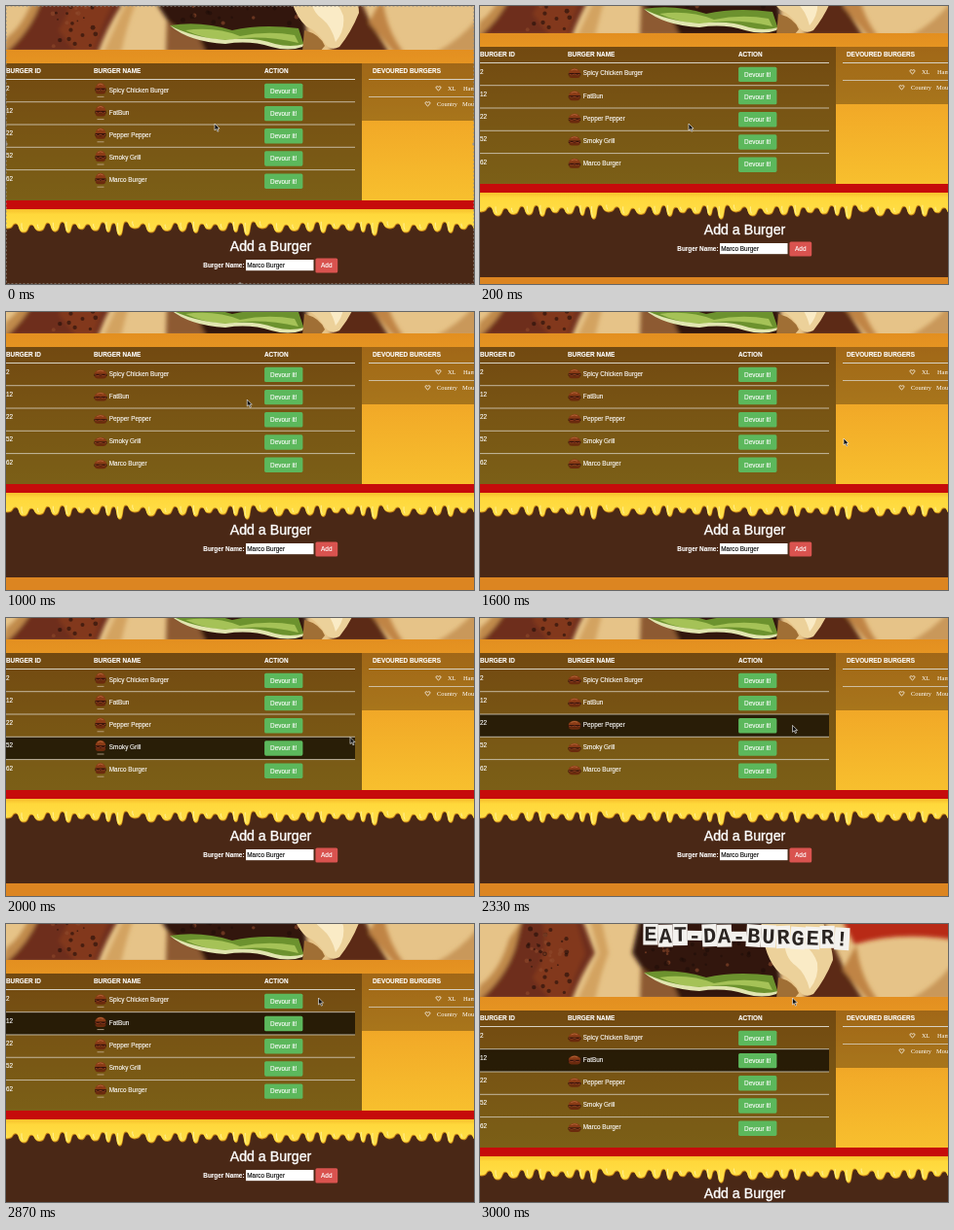
Write an HTML page that moves like this. It is 480 px wide and 286 px high and loops after 3070 ms.

```html
<!DOCTYPE html>
<html lang="en">
<head>
<meta charset="utf-8">
<title>Burger list</title>
<style>
  html, body { margin: 0; width: 100%; height: 100%; overflow: hidden; background: #4a2816; }
  svg { display: block; width: 480px; height: 286px; }
  text { font: 6.4px "Liberation Sans", Arial, sans-serif; fill: #fff; stroke: #fff; stroke-width: .12px; white-space: pre; }
  .bold { font-weight: bold; }
  .serif { font-family: "Liberation Serif", Times, serif; stroke: none; }
  .title { font-size: 14.2px; stroke-width: .35px; }
  .entry { fill: #000; stroke: #000; }
  .cutout { font: bold 22px "Liberation Mono", Courier, monospace; fill: #2b2522; stroke: none; text-anchor: middle; }
</style>
</head>
<body>
<svg viewBox="0 0 480 286">
  <defs>
    <linearGradient id="sky" x2="0" y2="1">
      <stop stop-color="#e38f20"/><stop offset=".5" stop-color="#f2ab28"/><stop offset="1" stop-color="#f8c22f"/>
    </linearGradient>
    <linearGradient id="cheese" x2="0" y2="1">
      <stop stop-color="#f6bf2c"/><stop offset=".2" stop-color="#ffd83b"/><stop offset="1" stop-color="#ffe04a"/>
    </linearGradient>
    <filter id="soft" x="-10%" y="-10%" width="120%" height="120%"><feGaussianBlur stdDeviation="2.2"/></filter>
    <filter id="crisp"><feGaussianBlur stdDeviation=".7"/></filter>
    <g id="burger">
      <path d="M-6 -.5C-6 -8 6 -8 6 -.5Z" fill="#8a3b16"/>
      <path d="M-3.5 -4Q0 -6.4 3 -4.2" stroke="#b96a3c" stroke-width=".9" fill="none"/>
      <path d="M-6.3 -.8H6.3V2H-6.3Z" fill="#34120a"/>
      <path d="M-5.8 .4L-3 1.6L0 .5L3 1.7L5.8 .4" stroke="#b04c28" stroke-width=".8" fill="none"/>
      <path d="M-6 2H6Q5.6 5 3 5H-3Q-5.6 5 -6 2Z" fill="#6b2a0d"/>
    </g>
  </defs>
  <g id="page"></g>
  <g id="handles" fill="#9a948c">
    <rect x=".5" y=".5" width="479" height="285" fill="none" stroke="#9a948c" stroke-dasharray="2 2" opacity=".6"/>
    <circle cx="0" cy="142" r="1.7"/><circle cx="480" cy="142" r="1.7"/>
    <circle cx="240" cy="286" r="1.7"/>
  </g>
  <path id="cursor" d="M0 0V7L1.7 5.5L2.9 8.2L4.1 7.7L2.9 5.1H5.1Z" fill="#111" stroke="#fff" stroke-width=".6"/>
</svg>
<script>
const LOOP = 3070, STEP = LOOP / 46, ROW = 23.3, REST = 22;
const page = document.getElementById("page");
const cursor = document.getElementById("cursor");
const handles = document.getElementById("handles");

function add(parent, tag, attrs, content) {
  const node = document.createElementNS("http://www.w3.org/2000/svg", tag);
  for (const key in attrs) node.setAttribute(key, attrs[key]);
  if (content) node.textContent = content;
  parent.appendChild(node);
  return node;
}
const rect = (x, y, width, height, fill, more) =>
  add(page, "rect", { x, y, width, height, fill, ...more });
const label = (x, y, content, style = "", more) =>
  add(page, "text", { x, y, class: style, ...more }, content);
const rule = (x, y, right, width = .8) =>
  add(page, "path", { d: `M${x} ${y}H${right}`, stroke: "#d8d2c4", "stroke-width": width });
const noise = n => { const v = Math.sin(n * 12.9898) * 43758.5453; return v - Math.floor(v); };

function button(x, y, width, height, fill, content) {
  rect(x, y, width, height, fill, { rx: 1.6 });
  label(x + width / 2, y + height / 2 + 2.3, content, "", { "text-anchor": "middle" });
}

// The y axis of the page starts at the lower edge of the photo.
function drawPhoto() {
  rect(-5, -110, 490, 110, "#e6c388");
  const soft = add(page, "g", { filter: "url(#soft)" });
  const crisp = add(page, "g", { filter: "url(#crisp)" });
  const shape = (group, d, fill) => add(group, "path", { d, fill });

  // Bun shading and meat
  shape(soft, "M0 -12Q20 -26 30 -60L44 -80L48 -50L14 4H-4Z", "#c08a4c");
  shape(soft, "M44 -82L36 -50Q26 -20 0 3H94Q104 -24 118 -45L104 -82Z", "#6e2f1a");
  shape(soft, "M62 -82Q74 -50 54 -20L72 3H90Q98 -26 108 -44L98 -82Z", "#82391f");
  shape(soft, "M112 -82L122 -45L100 3H118Q124 -25 132 -45L124 -82Z", "#d3a361");
  shape(soft, "M164 -82L156 -45L172 -20L166 3H310L302 -82Z", "#30180f");
  shape(soft, "M165 -30Q178 -18 196 -17L205 3H164Z", "#8d5a30");
  shape(soft, "M350 -82Q364 -50 374 -28L393 3H332L346 -24Z", "#5b2c18");
  shape(soft, "M370 -82H490V-58Q430 -68 384 -54Z", "#b82a18");
  shape(soft, "M386 -54Q390 -20 408 3H398L372 -28Z", "#c08444");
  shape(soft, "M440 3Q466 -10 485 -34V3Z", "#c9985a");

  for (let i = 0; i < 90; i++) {
    const x = i % 2 ? 48 + noise(i) * 44 : 170 + noise(i) * 130;
    add(crisp, "circle", {
      cx: x, cy: -72 + noise(i + 200) * (i % 2 ? 70 : 45), r: .8 + noise(i + 400) * 1.8,
      fill: i % 3 ? "#1f0d08" : "#8e4a2c", opacity: .6
    });
  }

  // Lettuce and melted cheese
  shape(crisp, "M168 -25Q200 -30 232 -20Q262 -27 300 -22L306 -4Q290 0 274 -5Q250 -12 225 -7Q190 -9 168 -25Z", "#6c922e");
  shape(crisp, "M184 -20Q215 -24 240 -14Q268 -20 296 -15L300 -7Q260 -16 230 -10Q205 -10 184 -20Z", "#a5c257");
  shape(crisp, "M168 -25Q190 -13 225 -10Q254 -14 276 -6Q292 -2 306 -6L304 -3Q290 2 272 -3Q250 -10 225 -6Q188 -8 168 -25Z", "#e1e5b0");
  shape(crisp, "M288 -82H350Q362 -50 362 -38Q354 -18 342 -3Q332 2 326 -8Q318 -20 308 -24Q290 -40 288 -82Z", "#ecd19a");
  shape(crisp, "M312 -60Q338 -58 346 -35Q348 -20 338 -8Q334 -24 324 -32Q312 -40 312 -60Z", "#faebc6");
  shape(crisp, "M306 -20Q322 -16 327 -4L322 2H304Z", "#a06f35");
}

function drawBanner() {
  [..."EAT-DA-BURGER!"].forEach((letter, i) => {
    const dash = letter === "-";
    const tilt = (noise(i + 3) - .5) * 8;
    const group = add(page, "g", {
      transform: `translate(${175 + i * 15.1} ${-65 + i * .25 + noise(i) * 2}) rotate(${tilt})`
    });
    const height = dash ? 10 : 23;
    add(group, "rect", { x: -7.6, y: -height / 2, width: 15.2, height, fill: "#f4f2ee" });
    add(group, "text", { y: 7.2, class: "cutout" }, letter);
  });
}

function drawCheese() {
  let x = -8, base = 177, edge = `M${x} 164V${base}`, glints = "";
  for (let i = 0; x < 490; i++) {
    const width = 11 + noise(i % 9 + 20) * 9, right = x + width, mid = x + width / 2;
    const tip = 183 + noise(i % 9 + 2) * 8;
    const next = 176 + noise(i % 9 + 40) * 4;
    edge += `C${x + 4} ${base} ${x + 2} ${tip} ${mid} ${tip}S${right - 4} ${next} ${right} ${next}`;
    glints += `M${mid - 1.8} ${base}Q${mid - 2.4} ${tip - 5} ${mid - .8} ${tip - 2}`;
    x = right;
    base = next;
  }
  edge += "V164Z";
  add(page, "path", { d: edge, fill: "#c98616", transform: "translate(.5 1)" });
  add(page, "path", { d: edge, fill: "url(#cheese)" });
  add(page, "path", { d: glints, fill: "none", stroke: "#fff3a0", "stroke-width": .9 });
}

drawPhoto();
drawBanner();
rect(0, 0, 480, 164, "url(#sky)");
rect(0, 14, 365, 141, "#000", { opacity: .5 });
rect(365, 14, 115, 59, "#000", { opacity: .3 });
const hover = rect(0, 0, 358, ROW, "#000", { opacity: .66 });

label(0, 24.1, "BURGER ID", "bold");
label(90, 24.1, "BURGER NAME", "bold");
label(265, 24.1, "ACTION", "bold");
label(376, 24.1, "DEVOURED BURGERS", "bold");
rule(0, 30.5, 358, 1.1);
rule(372, 30.5, 480, 1.1);
rule(372, 48.5, 480);

const burgers = [["2", "Spicy Chicken Burger"], ["12", "FatBun"], ["22", "Pepper Pepper"],
  ["52", "Smoky Grill"], ["62", "Marco Burger"]];
const icons = burgers.map(([id, name], i) => {
  const y = i * 23.2;
  if (i) rule(0, 30.4 + i * ROW, 358);
  label(0, 41.8 + y, id);
  label(105.8, 43.5 + y, name);
  button(265.1, 34.7 + y, 39.3, 15.4, "#5cb85c", "Devour it!");
  const stand = add(page, "path", { d: `M93.5 ${48.4 + y}H100.5`, stroke: "#d0b9a0", "stroke-width": .9 });
  const icon = add(page, "use", { href: "#burger" });
  return { stand, icon, y: 41.4 + y };
});

[[443.5, 40, 453, "XL", 469, "Ham"], [432.5, 56, 442, "Country", 468, "Mound"]]
  .forEach(([heartX, y, firstX, first, secondX, second]) => {
    add(page, "path", {
      d: "M0 2.4C-4 -.3 -2.4 -3 0 -1.2C2.4 -3 4 -.3 0 2.4Z", fill: "none", stroke: "#fff",
      "stroke-width": .8, transform: `translate(${heartX} ${y - .5})`
    });
    label(firstX, y + 2.3, first, "serif");
    label(secondX, y + 2.3, second, "serif");
  });

rect(0, 164, 480, 87, "#4a2816");
drawCheese();
rect(0, 155, 480, 9, "#c60b0b");
rect(0, 251, 480, 60, "#dc8521");

label(271.5, 207, "Add a Burger", "title", { "text-anchor": "middle" });
label(202.3, 224, "Burger Name:", "bold");
rect(246, 216, 69.5, 11.2, "#fff");
label(247.3, 224, "Marco Burger", "entry");
button(317.4, 214.4, 22.8, 15.2, "#d9534f", "Add");

const scrollKeys = [[0, 45], [67, 39], [133, 33], [200, 28], [267, 24], [333, 21.3], [400, 20],
  [470, 20], [600, 21], [734, REST], [2740, REST], [2803, 26], [2870, 37], [2936, 55], [3003, 75]];
const cursorKeys = [[0, 214, 121], [730, 214, 121], [1000, 247, 90], [1330, 335, 116],
  [1600, 373, 130], [1800, 373, 130], [2330, 320.5, 110.5], [2460, 320.5, 108], [2730, 320.5, 76]];

function sample(keys, t) {
  const next = keys.findIndex(key => key[0] > t);
  if (next < 0) return keys[keys.length - 1].slice(1);
  const a = keys[next - 1], b = keys[next], part = (t - a[0]) / (b[0] - a[0]);
  return a.slice(1).map((value, i) => value + (b[i + 1] - value) * part);
}

function render(time) {
  const t = Math.floor((time + 6) % LOOP / STEP) * STEP;
  const [scroll] = sample(scrollKeys, t);
  const [x, y] = sample(cursorKeys, t);
  page.setAttribute("transform", `translate(0 ${scroll})`);
  cursor.setAttribute("transform", `translate(${x} ${y})`);
  handles.style.display = t === 0 ? "" : "none";

  // A row keeps its highlight while the page scrolls under a still pointer.
  const row = Math.floor((y + 1 - REST - 30.4) / ROW);
  const hovered = t > 1050 && x < 358 && row >= 0 && row < burgers.length;
  hover.style.display = hovered ? "" : "none";
  hover.setAttribute("y", 30.4 + row * ROW);

  const stretch = (1 + Math.cos(t / 682 * 2 * Math.PI)) / 2;
  for (const { icon, stand, y: iconY } of icons) {
    icon.setAttribute("transform",
      `translate(97 ${iconY + 1 - 2 * stretch}) scale(${1.05 - .17 * stretch} ${.8 + .2 * stretch})`);
    stand.style.opacity = stretch > .6 ? .8 : 0;
  }
}

const start = performance.now();
function tick() {
  render(performance.now() - start);
  requestAnimationFrame(tick);
}
tick();
</script>
</body>
</html>
```
